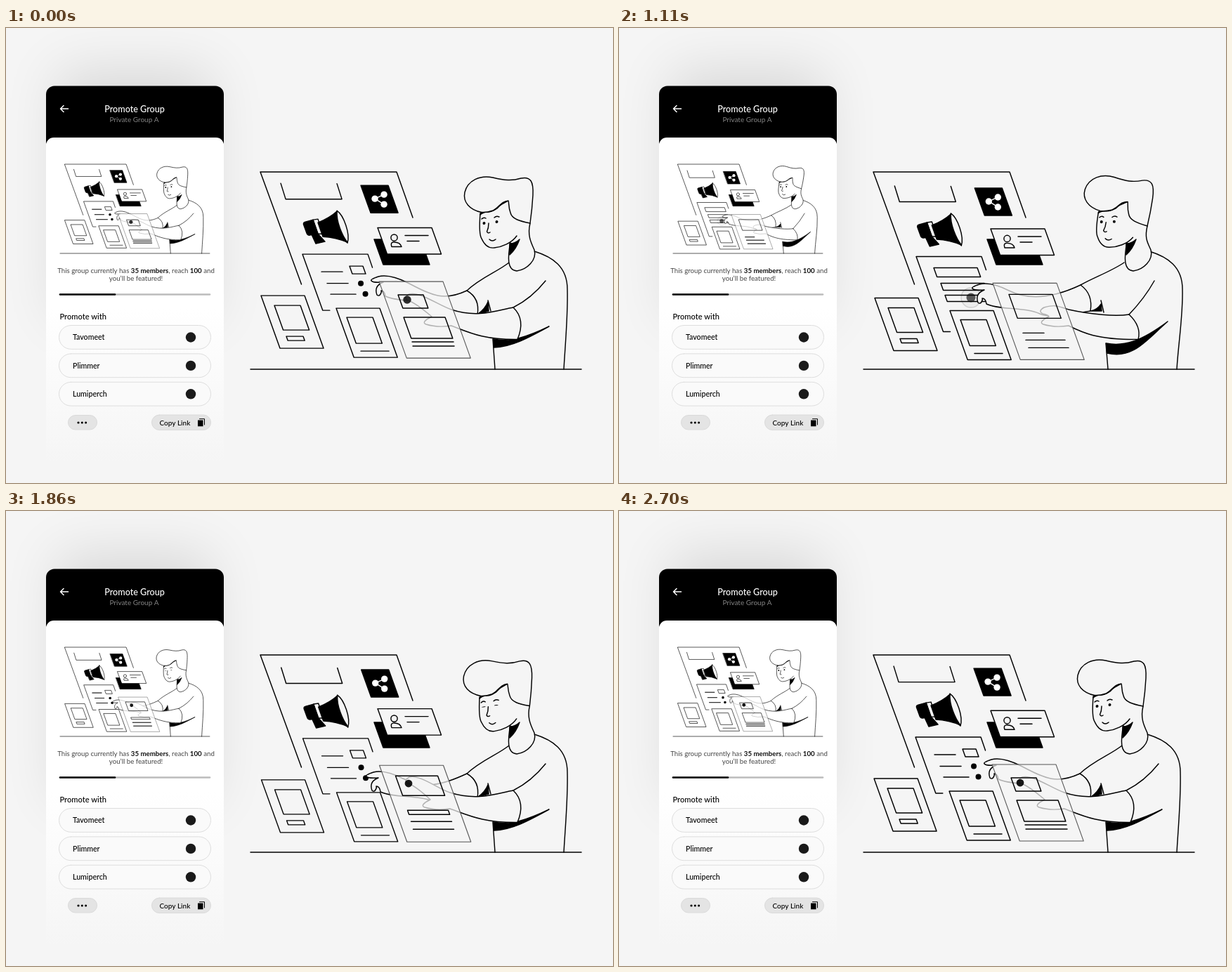
Recreate the animation shown at these times as an HTML page with a canvas. Size 864 px wide and 648 px high, loop 2.73 s.

```html
<!DOCTYPE html>
<html lang="en">
<head>
<meta charset="utf-8">
<title>Promote Group</title>
<style>
html, body { margin: 0; width: 864px; height: 648px; overflow: hidden; background: #f5f5f5; }
canvas { display: block; }
</style>
</head>
<body>
<canvas id="stage" width="864" height="648"></canvas>
<script>
const LOOP = 2730, PAGE = '#f5f5f5', INK = '#000', SKEW = 0.36;
const TIMES = [0, 720, 1110, 1590, 1860, 2370, 2700];
const stage = document.getElementById('stage').getContext('2d');
let g = stage;

const mix = (a, b, k) => a + (b - a) * k;
const ease = k => k * k * (3 - 2 * k);
const wave = (t, peak) => Math.cos(2 * Math.PI * (t - peak) / LOOP);

// Six poses, returning to the first one at the end of the loop.
function pose(t, values, times = TIMES) {
  const all = [...values, values[0]];
  if (t >= times.at(-1)) return all[0];
  const i = times.findIndex((_, n) => t < times[n + 1]);
  const k = ease((t - times[i]) / (times[i + 1] - times[i]));
  const a = all[i], b = all[i + 1];
  return Array.isArray(a) ? a.map((v, n) => mix(v, b[n], k)) : mix(a, b, k);
}

// Draws SVG path data, with optional fill and stroke.
function path(d, fill, stroke = INK) {
  const p = new Path2D(d);
  if (fill) { g.fillStyle = fill; g.fill(p); }
  if (stroke) { g.strokeStyle = stroke; g.stroke(p); }
}

function quad([x, y, w, h = 0], fill, stroke = INK) {
  if (w < 1) return;
  const s = SKEW * h;
  path(`M${x} ${y}h${w}l${s} ${h}h${-w}Z`, h > 1 ? fill : null, stroke);
}

function disc(x, y, r, fill, stroke) {
  g.beginPath();
  g.arc(x, y, Math.max(0, r), 0, 7);
  if (fill) { g.fillStyle = fill; g.fill(); }
  if (stroke) { g.strokeStyle = stroke; g.stroke(); }
}

function pill(x, y, w, h, r, fill, stroke) {
  g.beginPath();
  g.roundRect(x, y, w, h, r);
  g.fillStyle = fill;
  g.fill();
  if (stroke) { g.strokeStyle = stroke; g.stroke(); }
}

function shifted(x, y, draw) {
  g.save();
  g.translate(x, y);
  draw();
  g.restore();
}

function text(s, x, y, size, color = INK, weight = 500, align = 'left') {
  g.font = `${weight} ${size}px Lato, "Open Sans", sans-serif`;
  g.textAlign = align;
  g.fillStyle = color;
  g.fillText(s, x, y);
}

function tap(t, start, x, y) {
  const age = (t - start + LOOP) % LOOP;
  if (age > 320) return;
  disc(x, y, 5 + age / 80, `rgba(0,0,0,${1 - age / 320})`);
  const ring = 0.35 * (1 - age / 200);
  if (age > 60 && ring > 0) disc(x, y, 6 + age / 15, `rgba(0,0,0,${ring / 4})`, `rgba(0,0,0,${ring})`);
}

function board(paper) {
  path('M420.500 365L362 205H556L579 270');
  return paper;
}

function megaphone() {
  path('M424 281Q422 277 426 276L437 273L444 293L432 295Q429 295 428 292Z', INK);
  path('M437 273L444 272L451 293L444 293Z', null);
  path('M444 277Q460 271 471 261C470 275 478 295 486 305Q470 298 451 297Z', INK);
  path('M471 260C481 267 490 293 486 306C478 300 467 272 471 260Z', null);
  path('M435 294L444 293L454 304L441 307Z', INK);
}

function shareTile() {
  quad([505, 224, 39, 39], INK);
  path('M538 237L525 243L538 251', null, '#fff');
  for (const [x, y] of [[538, 237], [525, 243], [538, 251]]) disc(x, y, 4.7, '#fff');
}

function idCard(paper) {
  quad([529, 0, 77, 37.5], paper);
  disc(552.5, 14, 4.6, null, INK);
  path('M549 27Q547 21 551 20.500Q561 20 563 27Z', null);
  path('M568 11H601M571 19H588', null);
}

function pages(t, paper) {
  quad([363, 381, 62, 75], paper);
  quad([382, 395, 37, 35]);
  quad([399, 439, 24, 6]);

  const tall = pose(t, [80, 104, 107, 82, 79, 80]);
  path(`M${432 + SKEW * tall} ${322 + tall}h-10L422 322H515L521.500 341`, null);
  const list = [449, 347, 30, 0], second = [457, 363.5, 30, 0], third = [462, 379, 36, 0];
  quad(pose(t, [list, [448, 339, 60, 45], [447, 338, 62, 13], list, list, list]), paper);
  quad(pose(t, [second, [464, 384, 59, 0], [457, 360, 62, 10], second, second, second]), paper);
  quad(pose(t, [third, [481, 377, 26, 8], [463, 377, 61, 9], third, third, third]), paper);
  const thumb = [489, 339, 19, 11], gone = [500, 345, 0, 0];
  quad(pose(t, [thumb, gone, gone, thumb, thumb, thumb]), paper);
  disc(505, 363.5, pose(t, [4, 0, 0, 2.6, 4, 4]), INK);
  disc(511.5, 378.5, pose(t, [4, 0, 0, 4, 4, 4]), INK);

  quad([470, 399, 62, 70], paper);
  quad([485, 412, 37, 37]);
  path('M505 460H545', null);
}

function farArm(t, lean, paper) {
  const [x, y] = pose(t, [[520, 360], [503, 355], [503, 371], [503, 367], [513, 378], [520, 366]]);
  const cx = 656 + lean, cy = mix(374, 366, lean), by = mix(408, 403, lean);
  path(`M${cx} ${cy}C${cx - 36} ${cy + 17} ${x + 82} ${y + 18} ${x + 52} ${y + 3}
    C${x + 36} ${y - 5} ${x + 22} ${y - 9} ${x + 10} ${y - 6}Q${x - 2} ${y - 2} ${x} ${y}
    Q${x + 2} ${y + 3} ${x + 17} ${y + 2}C${x + 7} ${y + 6} ${x + 5} ${y + 12} ${x + 8} ${y + 20}
    C${x + 12} ${y + 24} ${x + 15} ${y + 16} ${x + 14} ${y + 14}Q${x + 19} ${y + 14} ${x + 20} ${y + 22}
    C${x + 38} ${y + 31} ${x + 75} ${y + 26} ${x + 96} ${y + 36}
    C${x + 115} ${y + 44} 650 ${by + 3} 671 ${by}`, paper);
}

function nearArm(t, reach, paper) {
  const [x, y, wx, wy] = pose(t, [[569, 384, 634, 401], [600, 407, 640, 401], [600, 403, 640, 401],
    [591, 403, 635, 400], [569, 384, 632, 401], [597, 429, 636, 406]]);
  const tx = mix(722, 726, reach), ty = mix(398, 408, reach), bx = mix(728, 739, reach);
  path(`M${tx} ${ty}C${tx - 20} ${ty + 3} 672 ${mix(414, 408, reach)} ${wx} ${wy}
    C${wx - 18} ${wy - 6} ${x + 20} ${y - 9} ${x + 5} ${y - 5}Q${x - 4} ${y} ${x + 3} ${y + 4}
    Q${x + 12} ${y + 6} ${wx - 28} ${wy + 10}Q${wx - 44} ${wy + 18} ${wx - 36} ${wy + 21}
    Q${wx - 20} ${wy + 26} ${wx} ${wy + 23}C660 ${wy + 33} 680 444 ${bx} 443.500`, paper);
  path(`M${tx} ${ty}Q${tx + 18} ${ty + 17} ${bx} 443.500`, null);
  path(`M${mix(768, 762, reach)} 360Q${mix(748, 748, reach)} 385 ${tx} ${ty}`, null);
}

function torso(lean, reach) {
  const s = 3 * lean;
  path(`M${752 + s} 318C${778 + s} 326 ${799 + s} 340 ${799 + s} 372C${800 + s} 410 796 450 794 486`, null);
  path(`M${716 + s} 334C700 347 676 355 ${656 + lean} ${mix(374, 366, lean)}
    Q${675} ${mix(385, 379, lean)} 671 ${mix(408, 403, lean)}`, null);
  path(`M672 ${mix(407, 403, lean)}Q682 400 686 ${mix(390, 393, lean)}L687 403Z`, INK);
  path(`M686 388L690 ${mix(403, 405, lean)}`, null);
  const top = mix(443, 449, reach), low = mix(455, 463, reach);
  const ex = mix(773, 781, reach), ey = mix(425, 418, reach);
  path(`M693 ${top}L696 486`, null);
  path(`M693.500 ${top}C718 ${top + 5} 742 ${mix(440, 447, reach)} ${ex} ${ey}
    C${mix(742, 750, reach)} ${mix(442, 445, reach)} ${mix(720, 732, reach)} ${mix(454, 472, reach)} 694.500 ${low}Z`, INK);
}

function head(t, lean, paper) {
  const turn = pose(t, [0, 0.15, 0.09, 0.04, -0.02, -0.045]);
  const dx = 3.2 * lean, dy = 2 * lean;
  const bx = 725 + dx + 21 * Math.cos(turn) + 32 * Math.sin(turn);
  const by = 310 + dy + 21 * Math.sin(turn) - 32 * Math.cos(turn);
  const n = 5 * lean;
  path(`M${718 + n} 304C${714 + n} 327 ${713 + n} 345 ${727 + n} 346C${742 + n} 344 ${756 + n} 330 ${752 + n} 316
    C${747 + n} 305 ${bx - 4} ${by + 17} ${bx} ${by}`, paper);
  path(`M${717 + n} 307Q${725 + n} 307 ${731 + n} 301Q${726 + n} 315 ${717 + n} 323Z`, INK);

  g.save();
  g.translate(725 + dx, 310 + dy);
  g.rotate(turn);
  g.translate(-725, -310);
  path('M675 264C674 277 673 294 677 300C681 309 687 314 695 313C706 312 720 306 727 296L728 260L714 247Z', paper, null);
  path('M675 264C674 277 673 294 677 300C681 309 687 314 695 313C706 312 720 306 727 296', null);
  path('M675 266Q676 259 692 257Q704 253 715 246Q706 249 699 257Q690 263 684 262Q678 263 675 266Z', INK);
  path(`M677 262.500C660 259 650 248 653 234C657 217 675 209 693 213C710 217 720 218 733 214
    C747 211 751 219 750 238C749 257 748 264 746 278C731 275 720 272 718 263
    C715 255 716 248 715 246C704 247 702 256 693 260Q684 263 677 262.500Z`, paper);
  const blink = Math.min(1, Math.abs(t - 720) / 90, Math.abs(t - 1860) / 90);
  for (const [x, y] of [[680.5, 278], [698.5, 276]]) {
    g.beginPath();
    g.ellipse(x, y, 2 + (1 - blink), 0.5 + 1.6 * blink, -0.1, 0, 7);
    g.fillStyle = INK;
    g.fill();
  }
  path('M677 272Q680 269 683 271M695 270Q698 267 702 269M687 278Q687 285 684.500 290Q686 293 689 291M688 301Q692 305 697 301', null);
  g.restore();
}

function glass(t, paper) {
  g.globalAlpha = 0.72;
  quad([531, 361, 91, 109], paper, null);
  g.globalAlpha = 1;
  g.lineWidth = 1.1;
  quad([531, 361, 91, 109], null, '#555');
  g.lineWidth = 1.45;
  const wide = [554, 377, 62, 34], row = [574, 432, 30, 0];
  quad(pose(t, [[558, 380, 36, 19], wide, wide, [554, 377, 60, 33], [554, 376, 60, 28], [562, 382, 15, 5]]));
  quad(pose(t, [[566, 412, 59, 30], row, row, row, [571, 425, 58, 6], [560, 392, 56, 60]]));
  const a = [578, 442, 56], b = [582, 453, 57];
  quad(pose(t, [[578, 447, 59], a, a, a, [576, 441, 58], [581, 451, 56]]));
  quad(pose(t, [[579, 453, 59], b, b, b, [579, 452, 58], [581, 452, 56]]));
}

function scene(t, paper) {
  const bob = 2 - 2 * wave(t, -170);
  const lean = pose(t, [0, 1, 1, 0.35, 0, 0], [0, 540, 1110, 1590, 1860, 2370, 2700]);
  const reach = pose(t, [0, 1, 1, 0.5, 0, 0.6], [0, 540, 1110, 1590, 1860, 2250, 2700]);
  g.lineWidth = 1.45;
  g.lineJoin = g.lineCap = 'round';
  board(paper);
  shifted(bob / 3, bob, () => {
    path('M391 221L398 243.500H478L471 221.500', null);
    shareTile();
    megaphone();
  });
  quad([524, 301, 66, 36], INK);
  shifted(0, 284.4 + 3 * wave(t, 660), () => idCard(paper));
  shifted(bob / 4, bob * 0.9, () => pages(t, paper));
  tap(t, 480, 501, 347);
  tap(t, 990, 501, 384);
  farArm(t, lean, paper);
  torso(lean, reach);
  nearArm(t, reach, paper);
  head(t, lean, paper);
  shifted(bob / 4, bob * 0.6, () => glass(t, paper));
  tap(t, 1830, 573, 388);
  tap(t, 2250, 588, 418);
  tap(t, 2670, 571, 387);
  path('M348 486H819', null);
}

function richLine(parts, center, y, size) {
  const font = bold => `${bold ? 700 : 400} ${size}px Lato, "Open Sans", sans-serif`;
  const widths = parts.map(([s, bold]) => (g.font = font(bold), g.measureText(s).width));
  let x = center - widths.reduce((a, b) => a + b) / 2;
  parts.forEach(([s, bold], i) => {
    text(s, x, y, size, bold ? '#111' : '#444', bold ? 700 : 400);
    x += widths[i];
  });
}

function phone() {
  g.fillStyle = PAGE;
  g.fillRect(0, 0, 864, 648);
  g.save();
  g.shadowColor = 'rgba(0,0,0,.12)';
  g.shadowBlur = 80;
  g.shadowOffsetX = 2000;
  g.fillStyle = INK;
  g.fillRect(75 - 2000, 62, 217, 350);
  g.restore();

  pill(57, 82.5, 253, 82, [12, 12, 0, 0], INK);
  const fade = g.createLinearGradient(0, 400, 0, 620);
  fade.addColorStop(0, '#fff');
  fade.addColorStop(1, PAGE);
  pill(57, 156, 253, 470, [11, 11, 0, 0], fade);

  g.lineWidth = 1.5;
  g.lineCap = g.lineJoin = 'round';
  path('M88.500 115H77.500M82 110.500L77.500 115L82 119.500', null, '#fff');
  text('Promote Group', 183, 120, 12.6, '#fff', 500, 'center');
  text('Private Group A', 182.5, 134, 10, '#858585', 400, 'center');
  richLine([['This group currently has '], ['35 members', true], [', reach '], ['100', true], [' and']], 185, 349, 9.7);
  richLine([['you’ll be featured!']], 185, 360, 9.7);

  g.lineWidth = 2.6;
  path('M77 379.500H290', null, '#bcbcbc');
  path('M77 379.500H155', null);

  text('Promote with', 76.5, 415, 11.1);
  g.lineWidth = 1;
  ['Tavomeet', 'Plimmer', 'Lumiperch'].forEach((name, i) => {
    const y = 423.5 + i * 40.4;
    pill(75.5, y, 216, 33.8, 16.9, '#fafafa', '#dedede');
    text(name, 95, y + 20.8, 10.6);
    disc(263, y + 17, 7.2, '#1a1a1a');
  });

  pill(88.5, 551.5, 41, 20.5, 10.2, '#e4e4e4', '#dadada');
  for (const x of [103, 108.3, 113.6]) disc(x, 562, 1.6, INK);
  pill(207.5, 551, 84, 21.5, 10.7, '#e4e4e4', '#dadada');
  text('Copy Link', 218.5, 565.5, 10);
  g.fillStyle = INK;
  g.fillRect(273, 558.5, 7.5, 8.8);
  path('M275.500 556.700H282.500V565', null);
}

const backdrop = document.createElement('canvas');
backdrop.width = 864;
backdrop.height = 648;
g = backdrop.getContext('2d');
phone();
g = stage;

function frame() {
  const t = Math.floor(performance.now() % LOOP / 30) * 30;
  g.drawImage(backdrop, 0, 0);
  scene(t, PAGE);
  g.save();
  g.translate(77, 321);
  g.scale(0.452, 0.452);
  g.translate(-348, -486);
  scene(t, '#fff');
  g.restore();
  requestAnimationFrame(frame);
}
frame();
</script>
</body>
</html>
```
